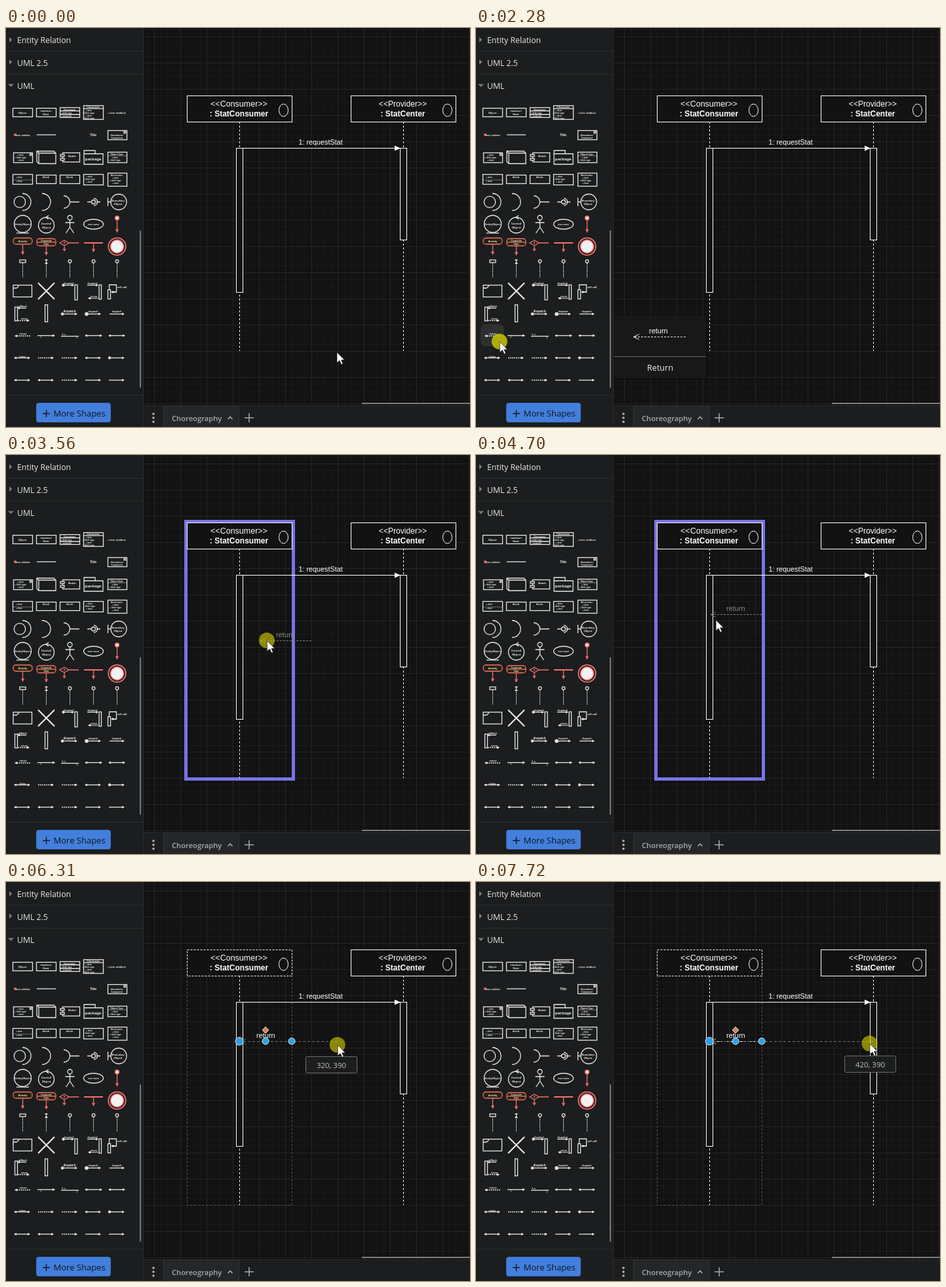
An HTML page that plays this animation: 708x609 px, repeating every 8000 ms.

```html
<!DOCTYPE html>
<html lang="en">
<head>
<meta charset="utf-8">
<title>Sequence diagram editor</title>
<style>
html, body { margin: 0; width: 100%; height: 100%; overflow: hidden; background: #121212; }
svg { display: block; }
text { white-space: pre; }
.ui { font-family: "Open Sans", "Noto Sans", sans-serif; }
.dia { font-family: "Liberation Sans", Arial, sans-serif; fill: #fff; }
.tiny { font-family: "Liberation Sans", Arial, sans-serif; fill: #f0f0f0; font-weight: bold; stroke: none; }
</style>
</head>
<body>
<svg id="stage" width="708" height="609" viewBox="0 0 708 609"></svg>
<script>
const LOOP = 8000;
const BG = '#121212', PANEL = '#1b1d1e', RED = '#f5706c';

// Markup helpers
const path = (d, extra = '') => `<path d="${d}" ${extra}/>`;
const rect = (x, y, w, h, extra = '') => `<rect x="${x}" y="${y}" width="${w}" height="${h}" ${extra}/>`;
const circle = (x, y, r, extra = '') => `<circle cx="${x}" cy="${y}" r="${r}" ${extra}/>`;
const ellipse = (x, y, rx, ry, extra = '') => `<ellipse cx="${x}" cy="${y}" rx="${rx}" ry="${ry}" ${extra}/>`;
const text = (x, y, s, size, cls, extra = '') =>
  `<text x="${x}" y="${y}" font-size="${size}" class="${cls}" ${extra}>${s.replace(/</g, '&lt;').replace(/>/g, '&gt;')}</text>`;
const MID = 'text-anchor="middle"';
const tiny = (x, y, s, size = 4) => text(x, y, s, size, 'tiny', MID);
const group = (id, body, extra = '') => `<g ${id ? `id="${id}"` : ''} ${extra}>${body}</g>`;
const times = (n, fn) => Array.from({ length: n }, (_, i) => fn(i)).join('');

const COL = i => 25 + 36 * i;
const ROW = i => 129 + 34 * i;

function arrow(x1, x2, y, { head = true, tail = false, dash = false } = {}) {
  const tip = (x, s) => path(`M${x} ${y}l${-4 * s} -2v4z`, 'fill="#e6e6e6" stroke="none"');
  return path(`M${x1} ${y}H${x2}`, dash ? 'stroke-dasharray="2 1"' : '') +
    (head ? tip(x2 + 1, 1) : '') + (tail ? tip(x1 - 1, -1) : '');
}

const down = (x, y1, y2) => path(`M${x} ${y1}V${y2}m-2 -4l2 4l2 -4`);

function palette() {
  let s = '';
  const add = (...parts) => { s += parts.join(''); };
  const lines = (x, y, n) => times(n, i => tiny(x, y + i * 4, i % 2 ? '+ field: type' : '+ item', 3.2));

  add(rect(10.5, 122.5, 30, 13), tiny(25, 130.5, 'Object'));
  add(rect(46.5, 122.5, 30, 13), tiny(61, 128, '«interface»', 3.5), tiny(61, 133, 'Name', 3.5));
  add(rect(82.5, 121.5, 30, 15), path('M82.5 126.5h30M82.5 132h30'), tiny(97, 125.5, 'Classname', 3.5), tiny(92, 130.6, '+ field: type', 3), tiny(92, 135.7, '+ method()', 3));
  add(rect(118.5, 118.5, 30, 21), path('M118.5 123h30'), tiny(133, 122.3, 'Classname', 3.8), lines(126, 127, 4));
  add(tiny(169, 130.5, '+ item: attribute', 3.7));

  add(circle(14, 163, 2, `fill="${RED}" stroke="none"`), tiny(26, 164.5, 'item: attribute', 3.3), path('M47 163h29'));
  add(tiny(133, 165, 'Title', 5), rect(155.5, 156.5, 29, 14), tiny(169, 165, '«Annotation»', 3.2), tiny(169, 168.6, 'Component', 3.2), rect(180, 158, 2.5, 2.5));

  add(rect(11.5, 190.5, 29, 15), rect(36.5, 192, 2.5, 2.5), lines(22, 195, 3));
  add(path('M47 188h26l3 3v16h-26l-3 -3zM47 188l3 3h26M50 191v16'));
  add(rect(86.5, 190.5, 26, 14), rect(83, 193, 6, 3, `fill="${PANEL}"`), rect(83, 199, 6, 3, `fill="${PANEL}"`), tiny(101, 196.5, 'Module', 3.5));
  add(path('M119 192v-5h17v5M119 192h29v16h-29z'), tiny(133, 201.5, 'package', 6.2));
  add(rect(155.5, 189.5, 29, 16), tiny(169, 194, 'Object:Type', 3.4), path('M155.5 195h29', 'stroke-width=".5"'), lines(166, 198.5, 2));

  add(rect(10.5, 223.5, 30, 15), path('M10.5 232h30', 'stroke-dasharray="2 1" stroke-width=".6"'), lines(20, 229, 1), lines(20, 235, 1));
  add(rect(46.5, 224.5, 30, 13), tiny(61, 229, 'block'), rect(82.5, 224.5, 30, 13), tiny(97, 229, 'block'));
  add(rect(118.5, 223.5, 30, 16), lines(127, 228, 3));
  add(rect(155.5, 221.5, 29, 20), tiny(169, 225.5, 'Block name', 3.2), lines(167, 229.5, 3));

  add(circle(21, 265.5, 8.7), path('M25 252.5a13 13 0 0 1 0 26'), path('M55 252.5a13 13 0 0 1 0 26'));
  add(path('M88 256a9 9 0 0 1 0 19M97 265.5h15'));
  add(path('M124 265.5h6M138 265.5h6M134 260a5.3 5.3 0 0 1 0 11'), circle(133.5, 265.5, 3));
  add(circle(172, 265.5, 12), path('M155.500 259v13M155.500 265.500h4.500'), tiny(171, 264.500, 'Boundary', 4.200), tiny(171, 269.500, 'Object', 4.200));

  add(circle(25.5, 299, 13), path('M16 313h19'), tiny(25.5, 301, 'EntityObject', 4.2));
  add(circle(61.5, 301, 12), path('M65 286l-4 3l4 3'), tiny(61.5, 300, 'Control', 4.4), tiny(61.5, 305.5, 'Object', 4.4));
  add(circle(97.5, 289.5, 3.5), path('M97.5 293v11M90.500 297h14M97.500 304l-6 9M97.500 304l6 9'));
  add(ellipse(133.5, 299.5, 15, 7.5), tiny(133.5, 301, 'use case', 4));

  add(group('', circle(169.5, 290, 3, 'fill="#ffd6d4"') + down(169.5, 293, 311) +
    rect(11, 320.5, 29, 9.5, 'rx="4" fill="#24240c"') + down(25.5, 330, 345) +
    rect(47, 321.5, 29, 11, 'rx="4" fill="#24240c"') + path('M47 327h29') + down(61.5, 332, 346) +
    path('M82 328l7 -4l7 4l-7 4zM96 328h15M89 332v8M87 337l2 3l2 -3') +
    path('M119 328h29', 'stroke-width="2"') + down(133.5, 328, 341) +
    circle(169.5, 333.5, 13.2, 'stroke-width="1.8"') +
    circle(169.5, 333.5, 10, 'fill="#f1f1f1"'), `stroke="${RED}"`));
  add(tiny(25.5, 326.5, 'Activity', 3.8), tiny(61.5, 325.8, 'Composite', 3.2), tiny(61.5, 331, 'State', 3.2), tiny(89, 329, 'if', 3));

  add(rect(21, 354, 9, 4), path('M59.500 354h4M61.500 353v6M59.500 360l2 -2l2 2'), times(3, i => circle(COL(i + 2) + 0.5, 356, 2.3)));
  add(times(5, i => path(`M${COL(i) + 0.5} 359v22`, 'stroke-dasharray="2 1" stroke-width="1"')));

  add(rect(11, 392.5, 28.5, 18), path('M11 397h5l3 -2.500v-2'), path('M49 389l25 25M74 389l-25 25', 'stroke-width="2.2"'));
  add(rect(105, 392, 4, 23), circle(87.5, 392.5, 1.5, 'fill="#e6e6e6"'), arrow(88, 103, 392.5), tiny(96, 391, 'dispatch', 3.8));
  add(rect(142, 392, 3.5, 22), arrow(124, 140, 392.5), arrow(126, 142, 412.5, { head: false, tail: true, dash: true }), tiny(132, 391, 'dispatch', 3.8), tiny(134, 410.500, 'return', 3.5));
  add(rect(155.5, 399.5, 4, 14), path('M157.500 399v-7h11v11h-7'), arrow(161, 168, 403, { head: false, tail: true }), tiny(177, 397, 'self call', 4));

  add(rect(13.5, 426, 4, 21), arrow(18, 31, 427.5, { head: false, tail: true }), arrow(18, 35, 446.5, { dash: true }), tiny(25, 425.500, 'callback', 3.6), tiny(28, 444.500, 'return', 3.6));
  add(rect(59.5, 422.500, 4, 26));
  add(times(3, i => arrow(COL(i + 2) - 11, COL(i + 2) + 11, 436.5) + tiny(COL(i + 2), 434, 'dispatch', i ? 3.6 : 4.6)));
  add(circle(86, 436.5, 1.6, 'fill="#e6e6e6"'), circle(123, 436.5, 2.2, 'fill="#e6e6e6"'));

  add(arrow(14, 38, 470, { head: false, tail: true, dash: true }), tiny(26, 468, 'return', 4));
  add(arrow(48, 74, 469.500), tiny(53, 472.500, '1', 3), arrow(84, 111, 470.500, { head: false }), tiny(88, 469, '0..n', 3), tiny(108, 473.500, '1', 3));
  add(arrow(121, 146, 469.500, { tail: true }), arrow(157, 181, 469.500, { tail: true }));
  add(times(5, i => arrow(COL(i) - 12, COL(i) + 11, 503.5, { tail: i === 0 || i === 3, dash: i === 1 || i === 2 })));
  add(tiny(25, 502.500, 'relation', 3), circle(158, 503.500, 1.500, 'fill="#e6e6e6"'));
  add(times(5, i => arrow(COL(i) - 12, COL(i) + 11, 537.5, { tail: i < 2, dash: i === 2 })));
  return group('', s, 'fill="none" stroke="#e6e6e6" stroke-width="1.3"');
}

function sidebar() {
  return rect(0, 0, 209, 609, `fill="${PANEL}"`) +
    rect(209, 0, 1, 609, 'fill="#2b2d2f"') +
    [35, 70, 560].map(y => rect(0, y, 209, 1, 'fill="#2a2c2e"')).join('') +
    path('M5 14l4.500 4l-4.500 4zM5 48l4.500 4l-4.500 4zM3 85.500h9l-4.500 4.500z', 'fill="#77797b"') +
    ['Entity Relation', 'UML 2.5', 'UML'].map((s, i) => text(17, 23 + 35 * i, s, 12.25, 'ui', 'fill="#e8e8e8"')).join('') +
    rect(0, 0, 36, 34, 'id="hover" rx="8" fill="#2d2f30"') +
    palette() +
    rect(204, 309, 2, 240, 'fill="#77797a"') +
    rect(46.5, 572.5, 113, 29, 'rx="3" fill="#427fdc" stroke="#3a70c4"') +
    path('M56 588.500h11M61.500 583v11', 'stroke="#11161f" stroke-width="1.4"') +
    text(72.5, 593, 'More Shapes', 13, 'ui', 'fill="#11161f"');
}

function footer() {
  return rect(543, 572, 165, 2, 'fill="#7f7f7f"') +
    rect(210, 576, 498, 33, `fill="${PANEL}"`) +
    rect(210, 576, 498, 1, 'fill="#2b2d2f"') +
    rect(240.5, 576.5, 115, 33, 'fill="#242628" stroke="#313335"') +
    times(3, i => circle(225, 589 + 6 * i, 1.8, 'fill="#b5b5b5"')) +
    text(253, 600, 'Choreography', 11.2, 'ui', 'fill="#a9abad" font-weight="600"') +
    path('M338.500 597l3.500 -3.500l3.500 3.500', 'fill="none" stroke="#b5b5b5" stroke-width="1.5"') +
    path('M364 595h14M371 588v14', 'stroke="#a9abad" stroke-width="1.5"');
}

function grid() {
  const rules = (step, color) => {
    let d = '';
    for (let x = 186; x < 708; x += step) if (x > 209) d += `M${x + 0.5} 0V576`;
    for (let y = 13 - 40; y < 576; y += step) d += `M210 ${y + 0.5}H708`;
    return path(d, `stroke="${color}"`);
  };
  return rules(10, '#191919') + rules(40, '#252525');
}

function lifeline(x, role, name, size, activeEnd, id) {
  const mid = x + 80;
  return path(`M${mid + 0.5} 143V493`, 'stroke="#fff" stroke-dasharray="3 3"') +
    rect(x + 0.5, 103.5, 160, 40, `id="${id}" fill="${BG}" stroke="#fff"`) +
    text(mid - 0.5, 120, role, size, 'dia', MID) +
    text(mid - 0.5, 135, name, 12, 'dia', MID + ' font-weight="bold"') +
    ellipse(x + 147.5, 125.5, 7, 9.5, 'fill="none" stroke="#fff"') +
    rect(mid - 4.5, 183.5, 10, activeEnd - 183, `fill="${BG}" stroke="#fff"`);
}

const returnEdge = (color, opacity = 1) =>
  group('', path('M436 .5H358', 'stroke-dasharray="3 2"') + path('M366 -3.500L358 .5L366 4.500'),
    `fill="none" stroke="${color}" opacity="${opacity}"`);

function diagram() {
  return rect(274.5, 101.5, 164, 393, 'id="target" fill="none" stroke="#7874e6" stroke-width="5"') +
    lifeline(276, '<<Consumer>>', ': StatConsumer', 12.5, 403, 'head') +
    lifeline(526, '<<Provider>>', ': StatCenter', 12.1, 323, 'head2') +
    path('M362 183.500H594', 'stroke="#fff"') + path('M602 183.500l-9 -4v8z', 'fill="#fff"') +
    text(446.5, 178, '1: requestStat', 10.8, 'dia') +
    group('ghost', returnEdge('#7d7d7d') + text(382, -5, 'return', 11, 'dia', 'style="fill:#858585"')) +
    group('selected',
      path('M276.500 144V493.500H436.500V144', 'fill="none" stroke="#555" stroke-dasharray="3 3"') +
      group('edge', returnEdge('#fff'), 'transform="translate(0 243)"') +
      path('', 'id="preview" fill="none" stroke="#727272" stroke-dasharray="4 3"') +
      text(382, 238, 'return', 11, 'dia') +
      path('M396 221l5 5l-5 5l-5 -5z', 'fill="#cf8159" stroke="#f3d9cc"') +
      [356, 396, 436].map((x, i) => circle(x, 243, 5, `${i ? '' : 'id="grip"'} fill="#2f9fe0" stroke="#d6ecfa"`)).join(''));
}

function floating() {
  return group('tooltip',
      rect(212, 441, 142, 96, 'rx="4" fill="#000" opacity=".25"') +
      rect(211, 439, 140, 94, 'rx="3" fill="#181818"') +
      rect(211, 501, 140, 1, 'fill="#6a6a6a"') +
      path('M320 471.500H240', 'stroke="#eee" stroke-dasharray="3 2"') +
      path('M249 467.500L240 471.500L249 475.500', 'fill="none" stroke="#eee"') +
      text(264, 466, 'return', 11, 'dia') +
      text(281, 523, 'Return', 12.6, 'ui', MID + ' fill="#f0f0f0"')) +
    group('hint',
      rect(-39, 0.5, 78, 25, `rx="2" fill="${PANEL}" stroke="#6b6d6f"`) +
      text(0, 18, '', 11.4, 'ui', 'id="coords" fill="#c2c2c2" ' + MID)) +
    circle(-0.5, -0.5, 12, 'id="press" fill="#c8c300"') +
    path('M0 0V16L4 12.500L6.700 18.500L9 17.500L6.500 11.700H11.500Z', 'id="pointer" fill="#fff" stroke="#111" stroke-width=".6"');
}

const stage = document.getElementById('stage');
stage.innerHTML = rect(0, 0, 708, 609, `fill="${BG}"`) + grid() + diagram() + sidebar() + footer() + floating();

const $ = id => document.getElementById(id);
const show = (id, on) => $(id).setAttribute('visibility', on ? 'visible' : 'hidden');
const move = (id, x, y) => $(id).setAttribute('transform', `translate(${x.toFixed(2)} ${y.toFixed(2)})`);

// Pointer track: time, x, y
const TRACK = [
  [0, 505, 495], [550, 505, 495], [760, 370, 500], [980, 143, 490], [1180, 62, 486],
  [1370, 42, 482], [1530, 36, 479], [2230, 36, 479], [2450, 90, 470], [2700, 260, 425],
  [2990, 371, 374], [3050, 373, 357], [3300, 412, 325], [3550, 400, 285], [3790, 366, 252],
  [4700, 366, 252], [5100, 425, 258], [5490, 437, 247], [5620, 435, 244], [6120, 435, 244],
  [6310, 506, 249], [6600, 560, 257], [6910, 588, 249], [7250, 598, 247], [7550, 598, 247],
  [7720, 601, 247], [LOOP, 601, 247]
];
TRACK[7] = [2280, 36, 479];

function pointerAt(t) {
  t = Math.max(0, t);
  const i = Math.max(1, TRACK.findIndex(k => k[0] >= t));
  const [t0, x0, y0] = TRACK[i - 1], [t1, x1, y1] = TRACK[i];
  const p = (t - t0) / (t1 - t0);
  return [x0 + (x1 - x0) * p, y0 + (y1 - y0) * p];
}

const snap = (v, origin) => Math.floor((v - origin) / 10) * 10;
const within = (t, a, b) => t >= a && t < b;

function draw(t) {
  const [x, y] = pointerAt(t), [lx, ly] = pointerAt(t - 27);

  const col = Math.floor((lx - 7) / 36), row = Math.floor((ly - 112) / 34);
  show('hover', t < 2340 && within(col, 0, 5) && within(row, 0, 13));
  move('hover', COL(col) - 18, ROW(row) - 17);
  show('tooltip', within(t, 1740, 2340));

  const dropped = t >= 4770, placing = within(t, 2340, 4770);
  show('ghost', placing && x > 210);
  move('ghost', snap(x, 366), snap(y, 3) + 3);
  show('target', placing && x > 272);
  show('selected', dropped);
  $('head').setAttribute('stroke-dasharray', dropped ? '3 2' : 'none');

  const pulling = t >= 6170;
  const end = Math.round((x - 186) / 10) * 10;
  show('edge', dropped && (!pulling || t >= 6950));
  show('preview', pulling);
  $('preview').setAttribute('d', `M${end + 186} 243.5H358M366 239.5L358 243.5L366 247.5`);
  $('grip').setAttribute('r', pulling ? 6 : 5);
  show('hint', pulling);
  move('hint', Math.round(lx) + 0.5, Math.round(ly) + 18);
  $('coords').textContent = `${end}, 390`;

  show('press', within(t, 2280, 4330) || t >= 5890);
  $('press').setAttribute('opacity', t < 2340 ? 0.85 : 0.66);
  move('press', x, y);
  move('pointer', x, y);
}

const start = performance.now();
function tick() {
  draw((performance.now() - start) % LOOP);
  requestAnimationFrame(tick);
}
tick();
</script>
</body>
</html>
```
